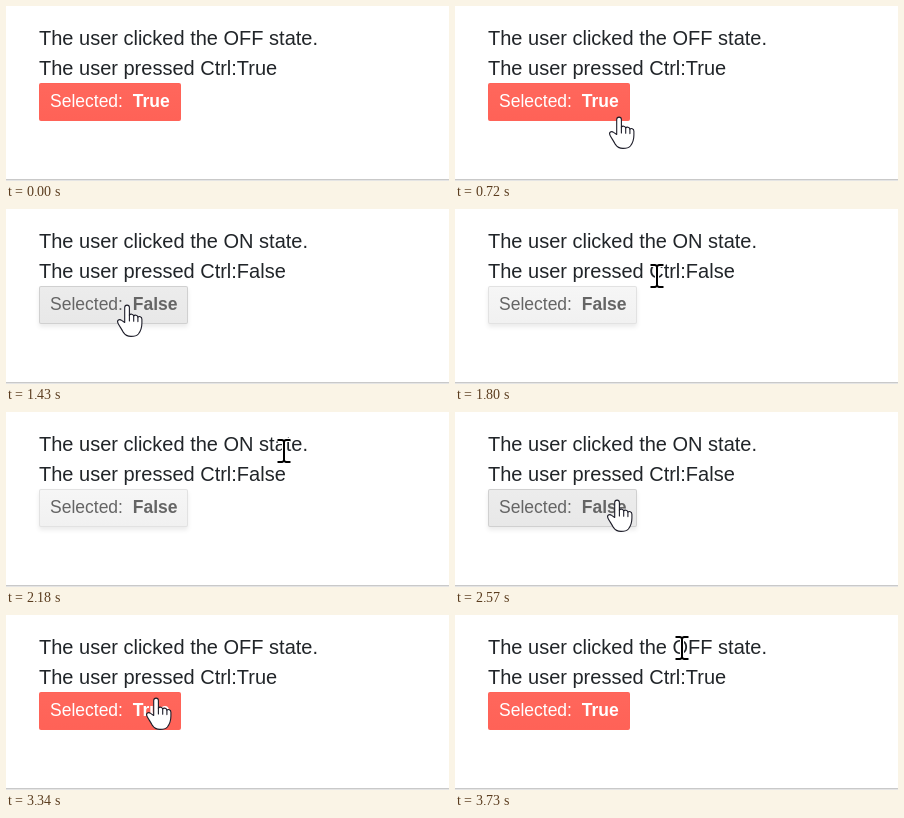
Animation, 443 px wide and 175 px high, one loop 3800 ms. Source, as an HTML page:

```html
<!DOCTYPE html>
<html lang="en">
<head>
<meta charset="utf-8">
<title>Toggle button events</title>
<style>
  html, body { margin: 0; width: 100%; height: 100%; overflow: hidden; background: #fff; }
  svg { display: block; width: 443px; height: 175px; font-family: "Liberation Sans", Arial, sans-serif; }
  .log { font-size: 20px; fill: #212529; }
  .label { font-size: 17.5px; }
  .shadow { filter: drop-shadow(0 3px 2px rgba(0, 0, 0, .08)); }
  .cursor { fill: #fff; stroke: #1c1c28; stroke-width: 1.1; stroke-linejoin: round; stroke-linecap: round; }
</style>
</head>
<body>
<svg viewBox="0 0 443 175">
  <defs>
    <linearGradient id="idle" x2="0" y2="1">
      <stop stop-color="#f6f6f6"/><stop offset="1" stop-color="#f1f1f1"/>
    </linearGradient>
    <linearGradient id="hover" x2="0" y2="1">
      <stop stop-color="#ececec"/><stop offset="1" stop-color="#e8e8e8"/>
    </linearGradient>
    <linearGradient id="red" x2="0" y2="1">
      <stop stop-color="#ff675c"/><stop offset="1" stop-color="#ff6257"/>
    </linearGradient>
  </defs>
  <rect y="173" width="443" height="1.5" fill="#c9c9c9"/>
  <text id="clicked" class="log" x="33" y="39"></text>
  <text id="ctrl" class="log" x="33" y="69"></text>
  <g id="button">
    <rect id="edge" x="33" y="77" height="38" rx="2"/>
    <rect id="face" x="34" y="78" height="36" rx="1"/>
    <rect id="focus" x="35.25" y="79.25" height="33.5" fill="none" stroke="#000" stroke-opacity=".13" stroke-width="2.5"/>
  </g>
  <text id="label" class="label" x="44" y="101">Selected:&#160; <tspan id="value" font-weight="bold"></tspan></text>
  <g id="hand" class="cursor">
    <path d="M-2.3 17.5V2.6C-2.3-.7 2.4-.7 2.4 2.6V10.2C3.2 8.6 6.4 8.8 6.7 11C7.6 9.6 10.6 10 10.9 12.2C11.9 10.9 14.9 11.4 14.9 14.2V18C14.9 24.5 13.4 26.5 11.4 29C9.4 31.2 7 31.4 4 31.4C-.4 31.4-2 30-3.6 27.4C-5.4 24.2-7 21.8-8.9 18.4C-10.6 15.2-7.6 13.6-5.4 15.4Z"/>
    <path fill="none" d="M2.4 10V16M6.7 11V16.2M10.9 12.2V16.6"/>
  </g>
  <path id="arrow" class="cursor" d="M0 0V24L5.5 19L9 27L12.5 25.5L9 17.5H17Z"/>
  <g id="beam" fill="none">
    <path stroke="#fff" stroke-width="4" d="M-6.5-11H-2L0-10L2-11H6.5M-6.5 11H-2L0 10L2 11H6.5M0-10V10"/>
    <path stroke="#000" stroke-width="2" d="M-6.5-11H-2L0-10L2-11H6.5M-6.5 11H-2L0 10L2 11H6.5M0-10V10"/>
  </g>
  <circle id="ring" r="18.5" fill="#ffde00" fill-opacity=".72"/>
</svg>
<script>
const LOOP = 3800;
const $ = id => document.getElementById(id);
const set = (id, attrs) => {
  for (const [name, value] of Object.entries(attrs)) $(id).setAttribute(name, value);
};
const show = (id, visible) => set(id, { display: visible ? "inline" : "none" });

const smooth = u => u * u * (3 - 2 * u);
const slowDown = u => 1 - Math.pow(1 - u, 1.41);

// Pointer moves: start and end time, number of positions, first and last point
const moves = [
  { t0: 410, t1: 880, n: 7, from: [323, 168], to: [121, 96], ease: slowDown },
  { t0: 1570, t1: 2030, n: 7, from: [125, 95], to: [278, 39], ease: smooth },
  { t0: 2110, t1: 2180, n: 2, from: [279, 39], to: [278, 39], ease: smooth },
  { t0: 2250, t1: 2570, n: 5, from: [269, 42], to: [162, 88], ease: smooth },
  { t0: 2640, t1: 2720, n: 2, from: [150, 88], to: [141, 88], ease: smooth },
  { t0: 3260, t1: 3730, n: 7, from: [144, 87], to: [227, 33], ease: smooth }
];

function pointerAt(t) {
  const move = moves.filter(m => t >= m.t0).pop();
  if (!move) return null;
  const last = move.n - 1;
  const step = Math.floor((t - move.t0) / (move.t1 - move.t0) * last + 0.06);
  const p = move.ease(Math.min(step, last) / last);
  return move.from.map((a, i) => Math.round(a + (move.to[i] - a) * p));
}

const within = (t, a, b) => t >= a && t < b;

function buttonStyle(red, hover) {
  if (red) return { edge: "#ff6358", face: "url(#red)", text: "#fff" };
  return hover
    ? { edge: "#d0d0d0", face: "url(#hover)", text: "#656565" }
    : { edge: "#e2e2e2", face: "url(#idle)", text: "#656565" };
}

function draw(t) {
  const on = !within(t, 1340, 3030);
  const pressed = within(t, 1260, 1340) || within(t, 2950, 3030);
  const red = on || pressed;
  const width = on ? 142 : 149;
  const at = pointerAt(t);
  const over = at && at[0] > 33 && at[0] < 33 + width && at[1] > 77 && at[1] < 115;
  const kind = !at ? "" : over ? "hand" : at[1] <= 77 ? "beam" : "arrow";
  const style = buttonStyle(red, over && t >= 1430);

  $("clicked").textContent = `The user clicked the ${on ? "OFF" : "ON"} state.`;
  $("ctrl").textContent = `The user pressed Ctrl:${on ? "True" : "False"}`;
  $("value").textContent = on ? "True" : "False";

  set("edge", { width, fill: style.edge });
  set("face", { width: width - 2, fill: style.face });
  set("focus", { width: width - 4.5 });
  set("label", { fill: style.text });
  set("button", { class: red ? "" : "shadow" });
  show("focus", pressed);

  for (const id of ["hand", "arrow", "beam"]) show(id, id === kind);
  if (kind) set(kind, { transform: `translate(${at})` });
  show("ring", pressed);
  if (pressed) set("ring", { cx: at[0], cy: at[1] + 2 });
}

function tick() {
  draw(performance.now() % LOOP);
  requestAnimationFrame(tick);
}
tick();
</script>
</body>
</html>
```
